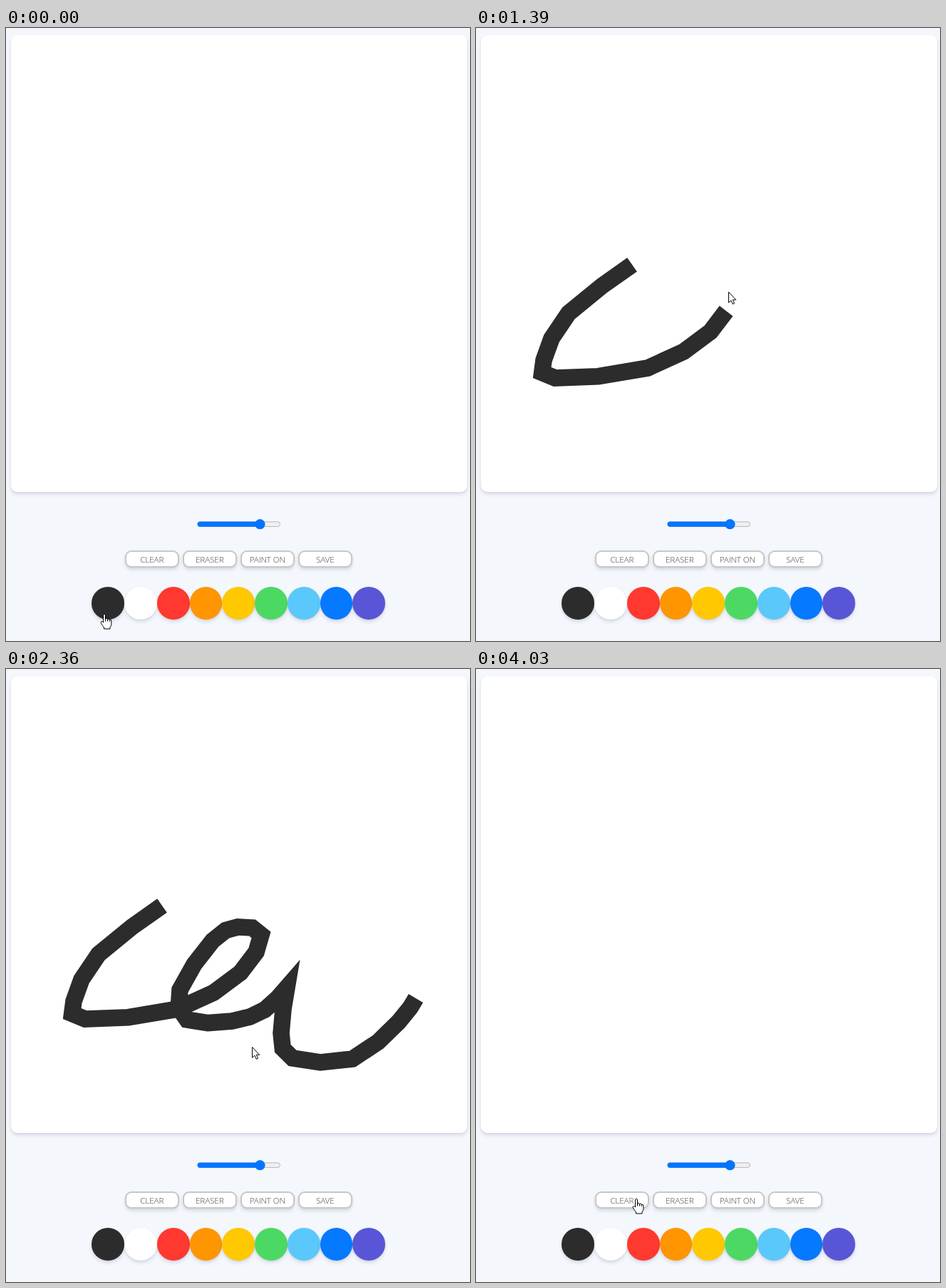
Recreate the animation shown at these times as an HTML page. Size 651x860 px, loop 4.67 s.

```html
<!DOCTYPE html>
<html lang="en">
<meta charset="utf-8">
<title>Paint board</title>
<style>
html, body { margin: 0; width: 100%; height: 100%; overflow: hidden; background: #f4f7fc; }
div { position: absolute; box-sizing: border-box; }
svg { position: absolute; left: 0; top: 0; }
.lift { box-shadow: 0 3.6px 5.4px rgba(50,50,93,.11), 0 1px 2.7px rgba(0,0,0,.08); }
#board { left: 6.5px; top: 10px; width: 640px; height: 640.5px; border-radius: 9px; background: #fff; }
.button {
  top: 733px; width: 76.5px; height: 23.5px; border: 2px solid #c8c8ca; border-radius: 9px; background: #fff;
  font: 300 11.7px/20.5px "Open Sans", sans-serif; letter-spacing: -.12px; text-align: center; color: #444;
}
.colour { top: 784px; width: 45.75px; height: 45.75px; border-radius: 50%; }
</style>
<body>
<div id="board" class="lift"></div>
<svg width="651" height="860">
  <rect x="269" y="692.8" width="115.5" height="6.6" rx="3.3" fill="#efefef" stroke="#b2b2b2" stroke-width=".9"/>
  <rect x="268.5" y="692.4" width="88" height="7.3" rx="3.6" fill="#0075ff"/>
  <circle cx="356.4" cy="696.2" r="7.1" fill="#0075ff"/>
  <polyline id="ink" fill="none" stroke="#2c2c2c" stroke-width="23.6"/>
  <g id="cursor" fill="#fff" stroke="#000" stroke-linejoin="round">
    <path id="arrow" d="M.5 .5V15.3L3.9 12.2 6.1 17.3 8.5 16.3 6.3 11.3H10.7Z"/>
    <path id="hand" d="M-1.5 12V1.5Q-1.5 .5 0 .5T1.5 1.5V7Q3 5.3 4.5 7.5 6 6 7.2 8.3 9.8 7.3 9.8 10V14.5Q9.8 17 8 18.5V21H-.5V19Q-2.5 17-4.8 12.6-5.2 10.6-3.5 10.6-2.5 10.8-1.5 12ZM1.5 7V10.5M4.5 7.5V10.5M7.2 8.3V10.8"/>
  </g>
</svg>
<script>
const LOOP = 4670, DRAW = 1080, DRAW_TIME = 762, CLEAR = 3850, LAG = 1.17;

const $ = id => document.getElementById(id);
const clamp = (v, lo, hi) => Math.min(hi, Math.max(lo, v));

// Position at index p (fractional between points) on a list of points.
function along(points, p) {
  const i = clamp(Math.floor(p), 0, points.length - 2);
  const k = clamp(p - i, 0, 1);
  return points[i].map((v, j) => v + (points[i + 1][j] - v) * k);
}

// Adds the Catmull-Rom midpoint between neighbouring points.
function halve(points) {
  const get = i => points[clamp(i, 0, points.length - 1)];
  return points.flatMap((b, i) => {
    if (i === points.length - 1) return [b];
    const a = get(i - 1), c = get(i + 1), d = get(i + 2);
    return [b, b.map((v, j) => (9 * (v + c[j]) - a[j] - d[j]) / 16)];
  });
}

// The line has one sharp corner, where the two curves meet.
const corner = [394, 447];
const loops = [[219, 332], [130, 400], [95, 466], [111, 491], [241, 477], [329, 426], [358, 373],
  [325, 362], [290, 381], [244, 450], [254, 492], [317, 494], [363, 478], corner];
const tail = [corner, [386, 511], [402, 546], [486, 547], [551, 495], [575, 462]];
const stroke = [...halve(loops), ...halve(tail).slice(1)];
const END = stroke.length - 1;

// Cursor legs: start, end, evenly timed points.
const legs = [
  [30, 970, [[138, 822], [190, 640], [206, 480], [232, 359]]],
  [970, DRAW, [[232, 359], stroke[0]]],
  [DRAW + DRAW_TIME, 2360, [stroke[END], [554, 475], [345, 530]]],
  [2360, 3030, [[345, 530], [256, 642], [233, 697]]],
  [3030, 3760, [[233, 697], [225, 740], [212, 742], [225, 743]]]
];

const drawn = t => END * clamp((t - DRAW) / DRAW_TIME, 0, 1.1) ** 1.2;

function cursorAt(t) {
  if (t > DRAW && t < DRAW + DRAW_TIME) return along(stroke, drawn(t));
  const [from, to, points] = legs.findLast(leg => leg[0] <= t) || legs[0];
  return along(points, clamp((t - from) / (to - from), 0, 1) * (points.length - 1));
}

function add(className, left, colour, text = "") {
  const el = document.createElement("div");
  el.className = className + " lift";
  el.style.left = left + "px";
  el.style.backgroundColor = colour;
  el.textContent = text;
  document.body.insertBefore(el, document.querySelector("svg"));
}

["CLEAR", "ERASER", "PAINT ON", "SAVE"].forEach((name, i) => add("button", 166.5 + 81 * i, "#fff", name));
["#2c2c2c", "#fff", "#ff3830", "#ff9500", "#ffc800", "#4cd963", "#5ac8fa", "#0579ff", "#5856d6"]
  .forEach((colour, i) => add("colour", 120.4 + 45.75 * i, colour));

function frame(now) {
  const t = now % LOOP;
  const [x, y] = cursorAt(t);

  const last = Math.floor(drawn(t) - LAG);
  const visible = last > 0 && t < CLEAR;
  $("ink").setAttribute("points", visible ? stroke.slice(0, last + 1).join(" ") : "");

  const overColour = Math.hypot(x - 143.5, y - 807) < 23;
  const overButton = y > 733 && y < 757 && x > 167 && x < 243;
  const pointing = overColour || overButton;
  $("cursor").setAttribute("transform", `translate(${Math.round(x)} ${Math.round(y)})`);
  $("hand").style.display = pointing ? "" : "none";
  $("arrow").style.display = pointing ? "none" : "";
  requestAnimationFrame(frame);
}
requestAnimationFrame(frame);
</script>
</body>
</html>
```
